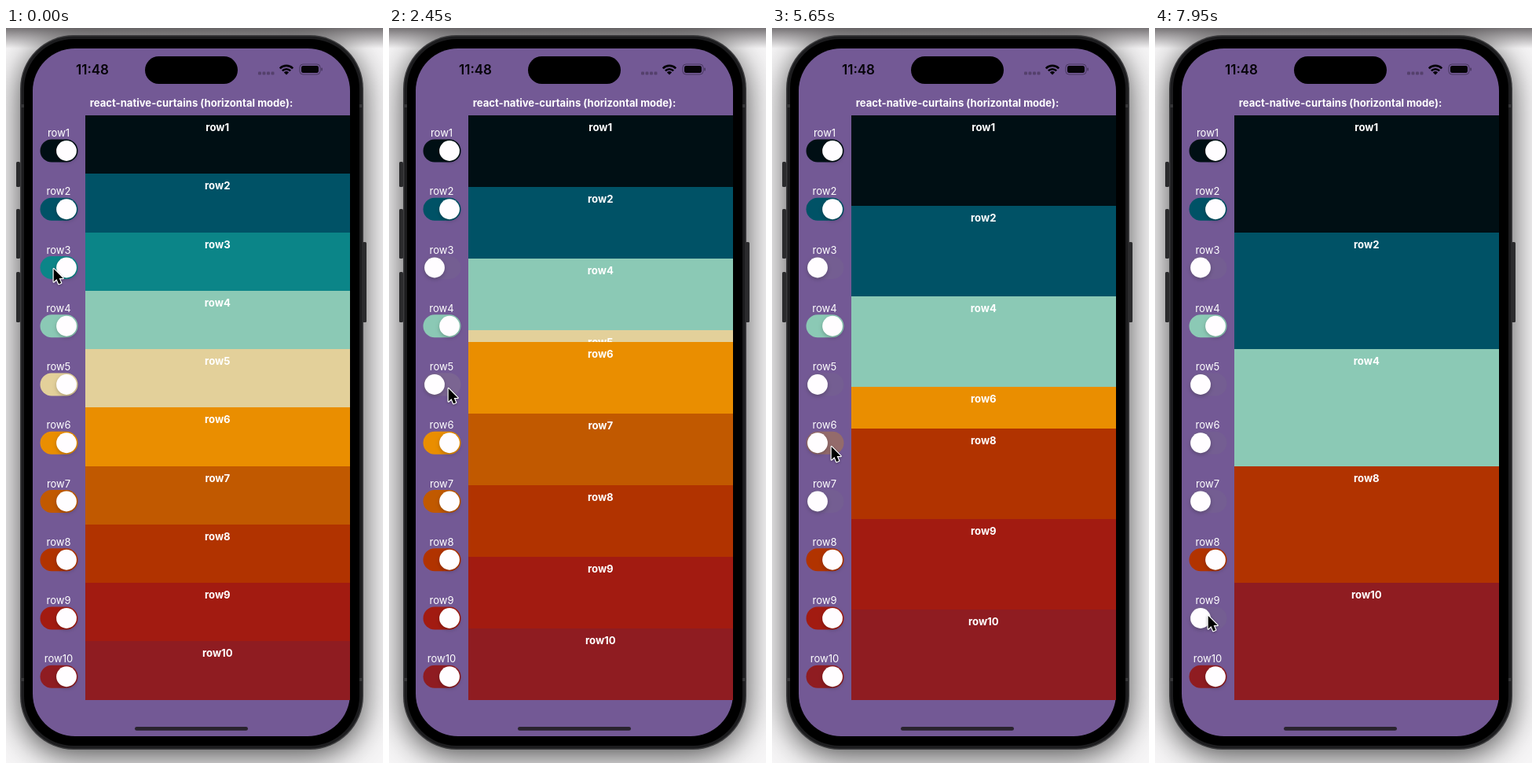
These frames come from a looping animation (480 px wide and 934 px high, 8000 ms). An HTML page with a canvas:

```html
<!DOCTYPE html>
<html lang="en">
<head>
<meta charset="utf-8">
<title>react-native-curtains</title>
<style>
  html, body { margin: 0; width: 100%; height: 100%; overflow: hidden; background: #f7f6f7; }
  canvas { display: block; width: 480px; height: 934px; }
</style>
</head>
<body>
<canvas width="480" height="934"></canvas>
<script>
const ctx = document.querySelector('canvas').getContext('2d');
const LOOP = 8000;
const PURPLE = '#735995';
const COLORS = ['#000f14', '#005266', '#0b8588', '#8bc9b5', '#e3d09a',
                '#ea8e00', '#c15900', '#b13300', '#a21b11', '#8f1c21'];
const TOP = 111, PITCH = 74.25, LEFT = 101, RIGHT = 438;

// Row index -> time at which its switch is turned off
const OFF_TIMES = { 2: 330, 4: 2000, 6: 3650, 5: 5300, 8: 7050 };

// Pointer stops: time, x, y
const POINTER = [[0, 60, 305], [1000, 60, 305], [1400, 74, 389], [1750, 75, 457],
                 [2600, 75, 457], [3250, 76, 607], [4550, 75, 607], [5100, 75, 531],
                 [6100, 75, 531], [6800, 67, 746], [LOOP, 67, 746]];

const clamp = v => Math.min(1, Math.max(0, v));
const smooth = v => v * v * (3 - 2 * v);
const ramp = (t, start, duration) => smooth(clamp((t - start) / duration));
const mix = (a, b, k) => a + (b - a) * k;

function box(x, y, w, h, r, fill) {
  ctx.beginPath();
  ctx.roundRect(x, y, w, h, r);
  ctx.fillStyle = fill;
  ctx.fill();
}

function text(str, x, y, font, fill = '#fff') {
  ctx.font = font + ' Inter, sans-serif';
  ctx.fillStyle = fill;
  ctx.textAlign = 'center';
  ctx.fillText(str, x, y);
}

function shadow(color, blur, dy) {
  ctx.shadowColor = color;
  ctx.shadowBlur = blur;
  ctx.shadowOffsetY = dy;
}

function drawPhone() {
  ctx.fillStyle = '#f7f6f7';
  ctx.fillRect(0, 0, 480, 934);
  const shade = ctx.createLinearGradient(0, 0, 0, 26);
  shade.addColorStop(0, 'rgba(50,45,48,.65)');
  shade.addColorStop(1, 'rgba(50,45,48,0)');
  ctx.fillStyle = shade;
  ctx.fillRect(0, 0, 480, 26);

  ctx.save();
  shadow('rgba(0,0,0,.7)', 40, 8);
  box(18, 9, 437, 908, 68, '#3b3b3d');
  ctx.restore();

  for (const [x, y, h] of [[13, 170, 32], [13, 230, 63], [13, 310, 64], [454, 272, 102]])
    box(x, y, 5, h, 1.5, '#2b2b2d');
  box(19.5, 10.5, 434, 905, 66.5, '#1c1c1e');
  ctx.fillStyle = '#353537';
  for (const y of [97, 826]) {
    ctx.fillRect(18, y, 5, 4);
    ctx.fillRect(450, y, 5, 4);
  }
  box(23, 14, 427, 898, 63, '#000');
  box(34, 26, 404, 874, 54, PURPLE);
}

function drawStatusBar() {
  text('11:48', 110, 59, '600 17px', '#050308');
  box(177, 36, 118, 35, 17.5, '#000');
  for (let i = 0; i < 4; i++) box(321 + i * 5.5, 55.5, 4, 4, 1.2, '#54406c');

  ctx.strokeStyle = ctx.fillStyle = '#050308';
  const arc = r => ctx.arc(357, 59.5, r, -Math.PI * .75, -Math.PI * .25);
  for (const r of [11.6, 7.3]) {
    ctx.beginPath();
    arc(r);
    ctx.lineWidth = 2.6;
    ctx.stroke();
  }
  ctx.beginPath();
  ctx.moveTo(357, 59.5);
  arc(4.4);
  ctx.fill();

  ctx.beginPath();
  ctx.roundRect(374, 46, 26, 13, 4);
  ctx.lineWidth = 1;
  ctx.strokeStyle = '#493860';
  ctx.stroke();
  box(376, 48, 22, 9, 2.3, '#050308');
  box(401.3, 50.5, 1.6, 4, 1, '#493860');
}

function drawSwitch(row, t) {
  const start = OFF_TIMES[row] ?? Infinity;
  const y = 156 + row * PITCH;
  text('row' + (row + 1), 67, y - 18, '400 13px');
  box(43.5, y - 14.6, 48, 29.2, 14.6, '#745e92');
  ctx.globalAlpha = 1 - ramp(t, start, 530);
  box(43.5, y - 14.6, 48, 29.2, 14.6, COLORS[row]);
  ctx.globalAlpha = 1;
  ctx.save();
  shadow('rgba(0,0,0,.22)', 5, 2);
  const x = mix(77, 58, ramp(t, start, 210));
  box(x - 12.9, y - 12.9, 25.8, 25.8, 12.9, '#fffdff');
  ctx.restore();
}

function drawCurtains(t) {
  const weights = COLORS.map((_, i) => 1 - ramp(t, (OFF_TIMES[i] ?? Infinity) + 110, 460));
  const unit = 10 * PITCH / weights.reduce((a, b) => a + b);
  let y = TOP;
  weights.forEach((weight, i) => {
    const top = Math.round(y);
    y += weight * unit;
    const height = Math.round(y) - top;
    if (height <= 0) return;
    ctx.save();
    ctx.beginPath();
    ctx.rect(LEFT, top, RIGHT - LEFT, height);
    ctx.clip();
    ctx.fillStyle = COLORS[i];
    ctx.fillRect(LEFT, top, RIGHT - LEFT, height);
    text('row' + (i + 1), 269.3, top + 20, '700 13.2px');
    ctx.restore();
  });
}

function drawPointer(t) {
  const next = POINTER.findIndex(stop => stop[0] > t);
  const [t0, x0, y0] = POINTER[next - 1], [t1, x1, y1] = POINTER[next];
  const k = ramp(t, t0, t1 - t0);
  ctx.save();
  ctx.translate(mix(x0, x1, k), mix(y0, y1, k));
  const arrow = new Path2D('M.7 1V17.6L4.5 14.1L7.2 20.2L10.2 18.9L7.6 13H12.6Z');
  shadow('rgba(0,0,0,.35)', 3, 1);
  ctx.lineWidth = 2.4;
  ctx.lineJoin = 'round';
  ctx.strokeStyle = '#fff';
  ctx.stroke(arrow);
  shadow('transparent', 0, 0);
  ctx.fillStyle = '#000';
  ctx.fill(arrow);
  ctx.restore();
}

function frame(now) {
  const t = now % LOOP;
  drawPhone();
  drawStatusBar();
  text('react-native-curtains (horizontal mode):', 236, 100, '700 13.1px');
  drawCurtains(t);
  COLORS.forEach((_, row) => drawSwitch(row, t));
  box(164, 888, 144, 4.8, 2.4, '#29232e');
  drawPointer(t);
  requestAnimationFrame(frame);
}
requestAnimationFrame(frame);
</script>
</body>
</html>
```
